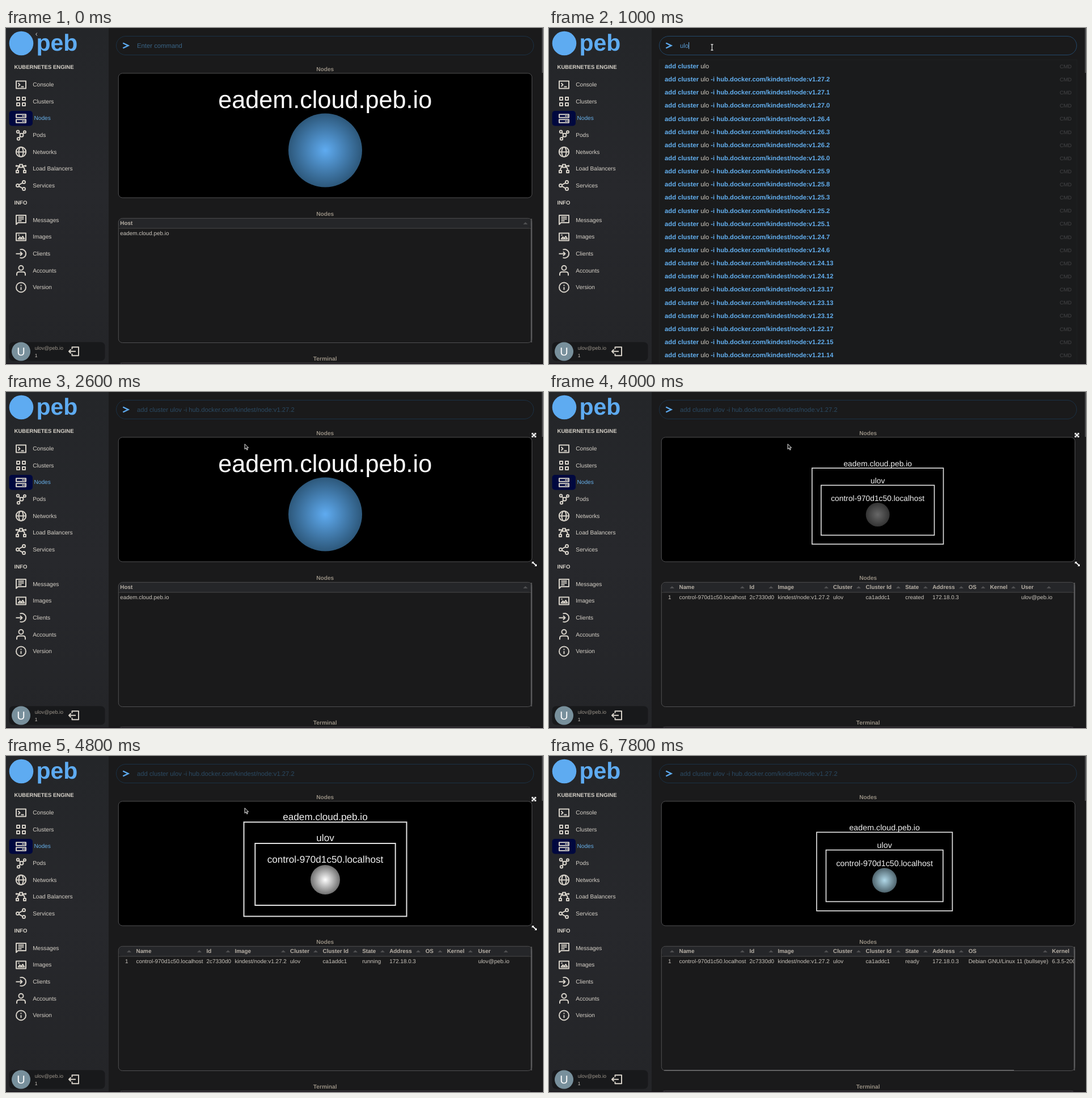
An HTML page for the animation above (8000 ms loop, 947x592 px).

```html
<!DOCTYPE html>
<html lang="en">
<head>
<meta charset="utf-8">
<title>Cluster console</title>
<style>
html, body { margin: 0; width: 100%; height: 100%; overflow: hidden; background: #1a1a1b; }
svg { display: block; width: 947px; height: 592px; text-rendering: geometricPrecision; }
text { font-family: "Liberation Sans", Arial, sans-serif; white-space: pre; }
.icon { fill: none; stroke: #d6d1c8; stroke-width: 2; stroke-linejoin: round; }
.white { fill: none; stroke: #fff; stroke-width: 1.8; }
</style>
</head>
<body>
<svg viewBox="0 0 947 592">
  <defs>
    <linearGradient id="side" x2="0" y2="1">
      <stop stop-color="#242629"/><stop offset=".5" stop-color="#27282c"/><stop offset="1" stop-color="#242528"/>
    </linearGradient>
    <clipPath id="table"><rect x="199" y="336" width="727" height="218"/></clipPath>
  </defs>
  <g id="base"></g>
  <g id="live"></g>
</svg>
<script>
const LOOP = 8000, TICK = 200;
const USER = 'ulov', MAIL = USER + '@peb.io', HOST = 'eadem.cloud.peb.io';
const NODE = 'control-970d1c50.localhost', IMAGE = 'kindest/node:v1.27.2';
const COMMAND = `add cluster ${USER} -i hub.docker.com/${IMAGE}`;
const VERSIONS = ('27.2 27.1 27.0 26.4 26.3 26.2 26.0 25.9 25.8 25.3 25.2 25.1 24.7 24.6 ' +
  '24.13 24.12 23.17 23.13 23.12 22.17 22.15 21.14').split(' ');
const BLUE = '#5eabf1', PITCH = 23.14;

const text = (x, y, s, size, fill, more = '') =>
  `<text x="${x}" y="${y}" font-size="${size}" fill="${fill}" ${more}>${s}</text>`;
const rect = (x, y, w, h, fill, more = '') =>
  `<rect x="${x}" y="${y}" width="${w}" height="${h}" fill="${fill}" ${more}/>`;
const path = (d, more = '') => `<path d="${d}" ${more}/>`;
const ring = (x, y, r) => `<circle cx="${x}" cy="${y}" r="${r}"/>`;
const box = (x, y, w, h) => `M${x} ${y}h${w}v${h}h${-w}z`;
const BOLD = 'font-weight="700" ', MID = 'text-anchor="middle"';

// Icons are drawn around (0, 0).
const ICONS = {
  Console: path(box(-8.5, -6.5, 17, 13) + 'M-5 -3l3 3l-3 3M0 3.5h5'),
  Clusters: path(box(-7.5, -7.5, 5, 5) + box(2.5, -7.5, 5, 5) + box(-7.5, 2.5, 5, 5) + box(2.5, 2.5, 5, 5)),
  Nodes: path(box(-8.5, -7, 17, 5.5) + box(-8.5, 2, 17, 5.5) + 'M2 -4.2h2M5 -4.2h2M2 4.8h2M5 4.8h2'),
  Pods: ring(1, 0, 3) + ring(-5.5, -6, 2.2) + ring(6.5, -5.5, 2) + ring(-4.5, 6.5, 2.2) +
    path('M-4 -4.5l3 2.5M5 -4l-2 2M-3.5 4.5l2.5 -2.5'),
  Networks: ring(0, 0, 8.7) + '<ellipse rx="4" ry="8.7"/>' + path('M-8.5 0h17'),
  'Load Balancers': path(box(-2.5, -7.5, 5, 5) + box(-8.5, 3, 4, 4) + box(4.5, 3, 4, 4) +
    'M-8 -5h5M3 -5h5M-6.5 3q0 -5 4 -7M6.5 3q0 -5 -4 -7') + ring(-8, -5, .8) + ring(8, -5, .8),
  Services: ring(-6, 0, 2.5) + ring(5, -6, 2.5) + ring(5, 6, 2.5) + path('M-4 -1l7 -4M-4 1l7 4'),
  Messages: path('M-8.5 7.5v-16h17v13h-14zM-5 -5.2h10M-5 -2h10M-5 1.2h6'),
  Images: path(box(-8.5, -6.5, 17, 13) + 'M-5 3.5l3 -3.5l2.5 2.5l2.5 -3.5l3 4.5z') + ring(-4, -3, .4),
  Clients: path('M-2 -7a7.6 7.6 0 1 1 0 14M-9 0h11M-1.5 -3.5l3.5 3.5l-3.5 3.5'),
  Accounts: ring(0, -4.5, 4) + path('M-7.5 9v-2.5q0 -4 4 -4h7q4 0 4 4v2.5'),
  Version: ring(0, 0, 8.5) + path('M0 -4.5v2M0 -.5v5')
};
const icon = (x, y, body) => `<g class="icon" transform="translate(${x} ${y})">${body}</g>`;

function sidebar() {
  let s = rect(0, 0, 181, 592, 'url(#side)');
  s += `<circle cx="27" cy="27" r="21.3" fill="${BLUE}"/>` + text(53.5, 39.5, 'peb', 41, BLUE, BOLD);
  s += text(14.5, 72.3, 'KUBERNETES ENGINE', 9.55, '#d8d3ca', BOLD);
  s += text(14.5, 311.3, 'INFO', 9.55, '#d8d3ca', BOLD);
  s += rect(5.5, 146, 41.5, 26.5, '#00083f', 'rx="5"');
  Object.keys(ICONS).forEach((name, i) => {
    const y = i < 7 ? 100 + 29.6 * i : 338.5 + 29.6 * (i - 7), on = name === 'Nodes';
    s += icon(26.5, y, ICONS[name]);
    s += text(on ? 49.5 : 47.2, y + 3.25, name, 10.14, on ? '#66aee8' : '#d6d1c8');
  });
  s += rect(5.5, 553.5, 169, 33, '#18191b', 'rx="7"');
  s += '<circle cx="26.5" cy="570" r="16.5" fill="#78909c"/>';
  s += text(26.5, 577.2, 'U', 20, '#fff', MID);
  s += text(50.7, 567.2, MAIL, 9.06, '#9c958b') + text(50.7, 579.8, '1', 8.5, '#d0cbc3');
  return s + icon(120, 569.7, path('M-3.500 -4v-3.500h11.500v15h-11.500v-3.500M-9 0h12M-5.500 -3.500l-3.500 3.500l3.500 3.500'));
}

function page() {
  const frame = 'stroke="#505052" rx="7"', title = '#958d81';
  return rect(0, 0, 947, 592, '#1a1a1b') + sidebar() +
    text(562.7, 75.5, 'Nodes', 10.2, title, BOLD + MID) +
    text(562.7, 331, 'Nodes', 10.2, title, BOLD + MID) +
    text(562.7, 585.8, 'Terminal', 10.2, title, BOLD + MID) +
    rect(198.3, 79.8, 729.2, 219.2, '#000', frame) +
    rect(198.3, 335.3, 729.2, 219.2, '#1a1a1b', frame) +
    rect(199, 336, 727, 17, '#252629', 'rx="6"') + rect(199, 352.6, 727, .8, '#505052') +
    rect(925.5, 336, 2, 218, '#5a5a5c') +
    rect(198.3, 590.2, 729.2, 9, '#000', frame) +
    rect(945, 0, 2, 79, '#4b4b4d');
}

function ball(x, y, r, inner, outer) {
  return `<radialGradient id="ball"><stop stop-color="${inner}"/><stop offset="1" stop-color="${outer}"/></radialGradient>` +
    `<circle cx="${x}" cy="${y}" r="${r}" fill="url(#ball)"/>`;
}

function cluster(scale, x, y, inner, outer) {
  const line = 'stroke="#e2e2e2" stroke-width="2"';
  const label = (dy, s) => text(0, dy, s, 17.13, '#f2f2f2', MID);
  return `<g transform="translate(${x} ${y}) scale(${scale})">` +
    rect(-143.5, -101.5, 287, 166, 'none', line) + rect(-123.7, -64, 247.4, 109, 'none', line) +
    label(-105.3, HOST) + label(-67.8, USER) + label(-29.8, NODE) +
    ball(0, 0, 26, inner, outer) + '</g>';
}

function graph(n) {
  if (n < 20) return text(562.7, 140.5, HOST, 43.2, '#fff', MID) + ball(563, 215.5, 65, '#5fabf0', '#2d587b');
  if (n < 21) return cluster(.807, 579.7, 216, '#676767', '#343434');
  if (n < 22) return cluster(.838, 592.4, 219.3, '#696969', '#353535');
  if (n < 39) {
    const x = n < 23 ? 567.5 : n < 24 ? 563.8 : 563;
    return cluster(n < 23 ? .99 : 1, x, 218, '#fff', '#707070');
  }
  return cluster(.834, 591.7, 219, '#b0d8e8', '#4f646d');
}

function table(n) {
  const head = (x, s) => text(x, 347.2, s, 9.9, '#b8b1a7', BOLD);
  const cell = (x, s) => text(x, 365.2, s, 9.9, '#cbc6be');
  const sort = x => path(`M${x - 4} 346l4 -4l4 4z`, 'fill="#505052"');
  if (n < 20) return head(201.3, 'Host') + sort(916) + cell(201.3, HOST);
  const ready = n >= 39, state = n < 22 ? 'created' : ready ? 'ready' : 'running';
  const rows = [
    [210, '', '1', 217], [229.5, 'Name', NODE, 341], [353.5, 'Id', '2c7330d0', 391.5],
    [403.5, 'Image', IMAGE, 489], [501, 'Cluster', USER, 546], [558.5, 'Cluster Id', 'ca1addc1', 616],
    [628.2, 'State', state, 664], [676.2, 'Address', '172.18.0.3', 727],
    [739.7, 'OS', ready ? 'Debian GNU/Linux 11 (bullseye)' : '', ready ? 875 : 765.5],
    [ready ? 887 : 777.7, 'Kernel', ready ? '6.3.5-200' : '', ready ? 960 : 819],
    [ready ? 980 : 832.7, 'User', MAIL, ready ? 1000 : 881.5]
  ];
  const body = rows.map(([x, h, c, a]) => head(x, h) + cell(x, c) + sort(a)).join('');
  return `<g clip-path="url(#table)">${body}</g>` + (ready ? rect(203, 553, 617, 1.5, '#68686a') : '');
}

function list(word, count, hover) {
  let s = rect(194.5, 56, 736.5, count * PITCH + (count > 8 ? 8 : 0), '#1a1b1c', 'stroke="#1f2022"');
  if (hover) s += rect(198, 57.5 + hover * PITCH, 730, 19, '#17222e');
  for (let i = 0; i < count; i++) {
    const y = 71 + i * PITCH;
    const tail = i ? ` -i hub.docker.com/kindest/node:v1.${VERSIONS[i - 1]}` : '';
    const bold = str => `<tspan font-weight="700" fill="#62aeee">${str}</tspan>`;
    s += text(204, y, `${bold('add cluster')} ${word}${bold(tail)}`, 11.25, '#cfcac1');
    s += text(921.7, y - .2, 'CMD', 9.2, '#454547', 'text-anchor="end"');
  }
  return s;
}

function prompt(n, word) {
  const typing = n > 2 && n < 12;
  let s = rect(194.5, 14.5, 736, 33, '#1a1a1b', `rx="16.5" stroke="${n > 0 && n < 12 ? '#23486a' : '#1b3145'}"`);
  s += path('M206.3 26.5L215.5 31L206.3 35.5', `fill="none" stroke="${BLUE}" stroke-width="2.4"`);
  if (n < 3) s += text(231, 35, 'Enter command', 11.3, '#396384');
  else if (typing) s += text(231, 35, word, 11.3, '#5598d1');
  else s += text(231, 35, COMMAND, 11.25, '#2b4a63');
  const caret = 231 + [0, 6.3, 8.8, 15.1, 20.7][word.length];
  if (typing && (n < 7 || n === 9)) s += rect(caret, 25, 1, 12, '#79b9ee');
  return s;
}

const panelTools = () =>
  path('M927.5 72.5l7 7M934.5 72.5l-7 7', 'class="white"') +
  path('M927 72h3.5l-3.5 3.5zM935 72v3.5l-3.5 -3.5zM927 80v-3.5l3.5 3.5zM935 80h-3.5l3.5 -3.5z', 'fill="#fff"') +
  path('M929 300.5l6 5', 'class="white"') + path('M927.5 299h4l-4 4zM936 307h-4l4 -4z', 'fill="#fff"');

function pointer(n) {
  const at = (x, y, d, more) => path(d, `transform="translate(${x} ${y})" stroke-linejoin="round" ${more}`);
  const dark = 'fill="#111" stroke="#e8e8e8" stroke-width="1"';
  const arrow = 'M0 0v9l2.2 -2l1.6 3.5l1.5 -.7l-1.6 -3.3h3z';
  const hand = 'M-1 0v5l-1.5 -1l-.5 1.5l2.5 3.5h5l1 -3v-2.5l-5 -1v-2.5z';
  if (n < 2 || n > 29) return '';
  if (n < 3) return at(300, 100, arrow, dark);
  if (n < 7) return at(287.5, 34, 'M-2 -5h4M0 -5v10M-2 5h4', 'fill="none" stroke="#ddd" stroke-width="1.3"');
  if (n < 12) return at(n < 8 ? 349 : n < 9 ? 390 : 421, n < 8 ? 87 : n < 9 ? 112 : 91.5, hand, dark);
  return at(421, 91.7, arrow, dark);
}

function scene(n) {
  const word = USER.slice(0, Math.max(0, n - 2));
  const hover = n === 8 ? 2 : n > 8 ? 1 : 0;
  let s = graph(n) + table(n) + prompt(n, word);
  if (n > 3 && n < 12) s += list(word, n < 5 ? 8 : 23, hover);
  if (n === 2 || (n > 11 && n < 30)) s += panelTools();
  if (n < 2 || n === 30) s += path('M54.7 8.5l-2 2.5l2 2.5', 'fill="none" stroke="#ddd"');
  return s + pointer(n) + rect(0, 591, 947, 1, '#150d18');
}

const live = document.getElementById('live');
document.getElementById('base').innerHTML = page();
const start = performance.now();
let shown = -1;

function draw(now) {
  const n = Math.floor((Math.max(0, now - start) % LOOP) / TICK);
  if (n !== shown) live.innerHTML = scene(shown = n);
  requestAnimationFrame(draw);
}
draw(start);
</script>
</body>
</html>
```
